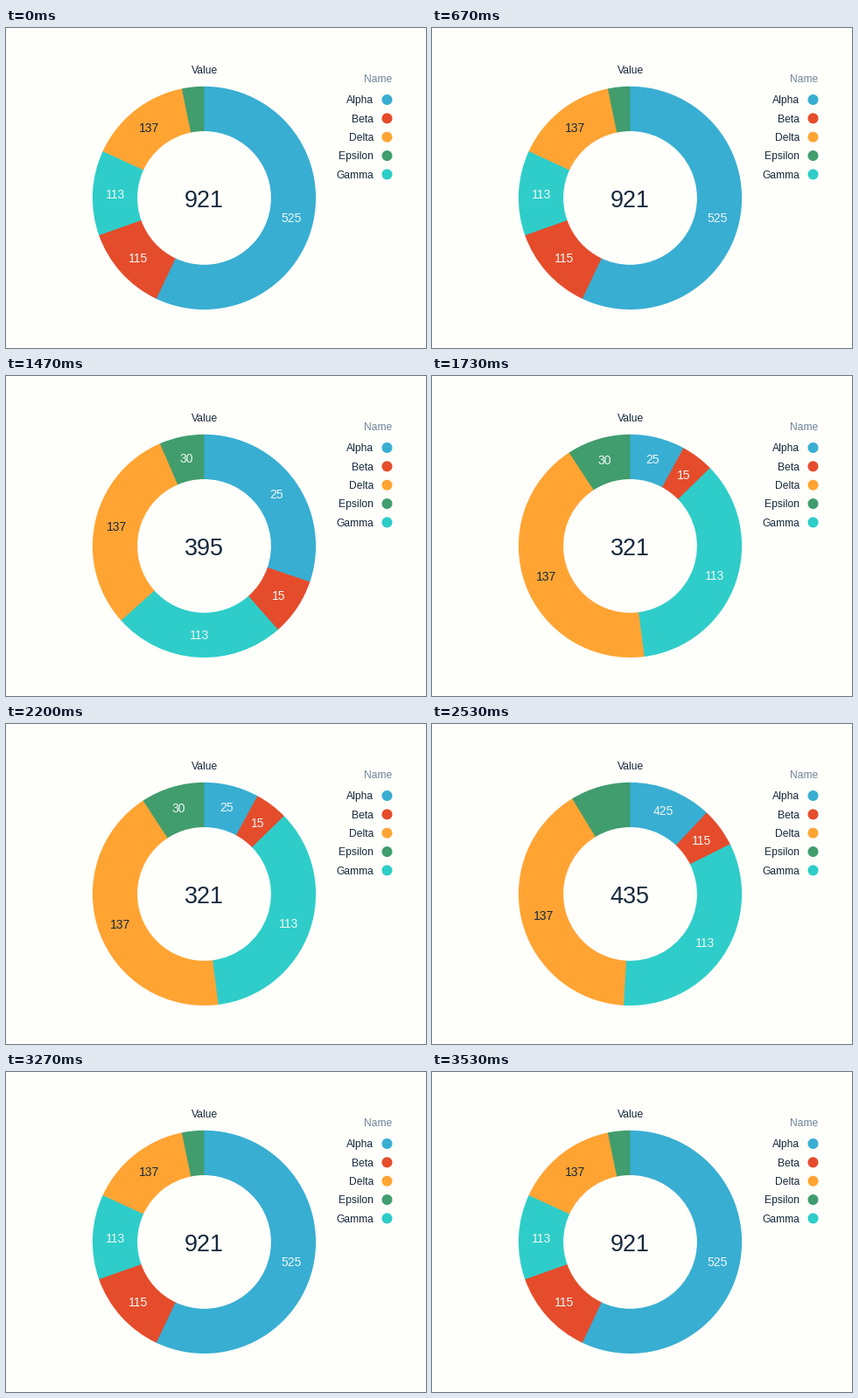
Recreate the animation shown at these times as a matplotlib script. Size 480x366 px, loop 4.07 s.

```python
import numpy as np
import matplotlib.pyplot as plt
from matplotlib.animation import FuncAnimation
from matplotlib.patches import Circle, Wedge

W, H, DPI = 480, 366, 100
LOOP, TICK = 4070, 10          # ms
STEP = 200 / 3                 # poses advance at 15 per second
TWEEN = 140                    # length of one transition, ms

CX, CY, R_OUT, R_IN = 226.5, 194.4, 127.6, 76.4
R_LABEL = (R_OUT + R_IN) / 2
OVERLAP = 0.4                  # degrees tucked under a neighbour to hide seams

BACK, INK, MUTED, PALE = "#fefefa", "#16293d", "#71879c", "#eef6f4"
COLORS = {
    "Alpha": "#38aed2",
    "Beta": "#e54c2b",
    "Gamma": "#2ecdc9",
    "Delta": "#ffa433",
    "Epsilon": "#419d6d",
}

# Only the first two values ever change.
REST = [113.3, 137.4, 29.6]
FULL = np.array([525.4, 115.3] + REST)
LOW = np.array([25.4, 15.3] + REST)
PART = np.array([425.4, 115.3] + REST)
CHANGES = [(1390.2, FULL, LOW), (2520.3, LOW, PART), (3055.5, PART, FULL)]
MIN_SHARE = 0.04               # smaller slices carry no label

plt.rcParams["font.family"] = ["Liberation Sans", "DejaVu Sans"]
fig = plt.figure(figsize=(W / DPI, H / DPI), dpi=DPI, facecolor=BACK)
ax = fig.add_axes([0, 0, 1, 1])
ax.set_xlim(0, W)
ax.set_ylim(H, 0)
ax.axis("off")


def write(x, y, text, px, color=INK, ha="center"):
    return ax.text(x, y, text, fontsize=px * 72 / DPI, color=color,
                   ha=ha, va="baseline")


def draw_legend():
    write(441.5, 62, "Name", 12.1, MUTED, "right")
    for i, name in enumerate(["Alpha", "Beta", "Delta", "Epsilon", "Gamma"]):
        y = 82 + 21.35 * i
        write(420, y + 4.2, name, 12.1, ha="right")
        ax.add_patch(Circle((435.5, y), 6, color=COLORS[name], lw=0))


write(227, 52, "Value", 12.1)
draw_legend()
wedges = [
    ax.add_patch(Wedge((CX, CY), R_OUT, 0, 1, width=R_OUT - R_IN,
                       facecolor=color, lw=0))
    for color in COLORS.values()
]
labels = [write(0, 0, "", 14, INK if name == "Delta" else PALE)
          for name in COLORS]
total = write(226, 204.8, "", 27)


def bounds(values):
    """Slice edges in degrees, clockwise from the top."""
    return np.concatenate([[0], np.cumsum(values)]) / values.sum() * 360


def state(ms):
    """Current start values, end values and progress."""
    now = int((ms + 5) / STEP) * STEP
    old, new, p = FULL, FULL, 1.0
    for start, before, after in CHANGES:
        if now >= start:
            old, new, p = before, after, min((now - start) / TWEEN, 1)
    return old, new, p


def update(i):
    old, new, p = state(i * TICK)
    edges = bounds(old) * (1 - p) + bounds(new) * p
    count = 1 - (1 - p) ** 2.65    # the sum runs ahead of the slices
    total.set_text(f"{old.sum() + (new.sum() - old.sum()) * count:.0f}")
    for k, (wedge, label) in enumerate(zip(wedges, labels)):
        a, b = edges[k], edges[k + 1]
        first, last = k == 0, k == len(wedges) - 1
        wedge.set_theta1(a - 90 - OVERLAP * first)
        wedge.set_theta2(b - 90 + OVERLAP * (not last))
        mid = np.radians((a + b) / 2)
        label.set_position((CX + R_LABEL * np.sin(mid),
                            CY - R_LABEL * np.cos(mid) + 4.8))
        label.set_text(f"{new[k]:.0f}")
        # Which labels show depends on the shares being moved to.
        label.set_visible(new[k] / new.sum() > MIN_SHARE)
    return [*wedges, *labels, total]


anim = FuncAnimation(fig, update, frames=LOOP // TICK, interval=TICK,
                     init_func=lambda: update(0), repeat=True,
                     repeat_delay=0, blit=False)
plt.show()
```
